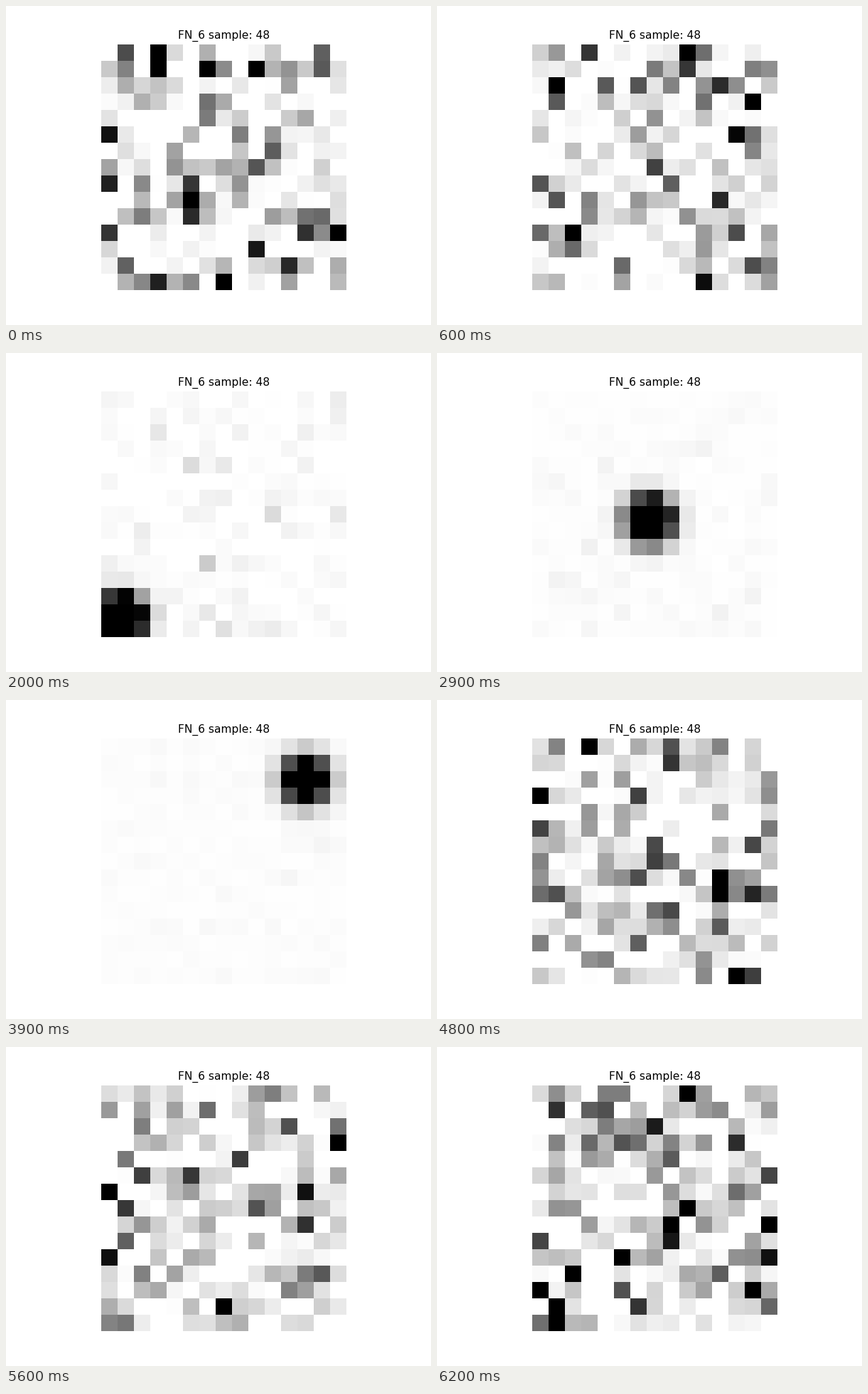
These frames come from a looping animation (598 by 448 pixels, 6300 ms). A matplotlib script:

```python
import numpy as np
import matplotlib.pyplot as plt
from matplotlib.animation import FuncAnimation

W, H, DPI = 598, 448, 100
SCALE = W / 640         # text shrinks with the default 640 px figure
N = 15                  # cells per side
FRAMES, STEP_MS = 63, 100
START, STOP = 19, 43    # the spot is on screen in between
HOLDS = (32, 37, 42)    # the spot pauses on these ticks
SPEED = 2 / 3           # cells per step along the diagonal

rows, cols = np.mgrid[:N, :N]


def noise(t):
    """Dense noise: many white cells, a long tail of dark ones."""
    rng = np.random.default_rng(4800 + t)
    return rng.exponential(0.3, (N, N)) - 0.13


def faint(t):
    """Background that fades out while the spot crosses."""
    if 32 <= t <= 37:
        t = 31
    elif t in HOLDS:
        t -= 1
    rng = np.random.default_rng(4800 + t)
    fade = np.clip((t - 20) / 11, 0, 1)
    scale = 0.028 + (0.007 - 0.028) * fade
    return rng.exponential(scale, (N, N)) - 0.01 * (1 - fade) + 0.006 * fade


def spot(t):
    """Gaussian moving from the lower left to the upper right."""
    steps = t - START - sum(t >= h for h in HOLDS)
    p = SPEED * steps
    peak = 2.4 + 0.045 * max(0, 18 - steps)
    d2 = (cols - p) ** 2 + (rows - (N - 1 - p)) ** 2
    return peak * np.exp(-0.63 * d2)


def shade(t):
    dark = spot(t) + faint(t) if START <= t < STOP else noise(t)
    return 1 - np.clip(dark, 0, 1)


fig, ax = plt.subplots(figsize=(W / DPI, H / DPI), dpi=DPI, facecolor="white")
fig.subplots_adjust(left=0.125, right=0.9, bottom=0.11, top=0.88)
ax.axis("off")
ax.set_title("FN_6 sample: 48", fontsize=12 * SCALE, pad=6 * SCALE,
             family="DejaVu Sans")
image = ax.imshow(shade(0), cmap="gray", vmin=0, vmax=1,
                  interpolation="nearest")


def update(t):
    image.set_data(shade(t))
    return (image,)


anim = FuncAnimation(fig, update, frames=FRAMES, interval=STEP_MS,
                     repeat=True, repeat_delay=0, blit=False)
plt.show()
```
